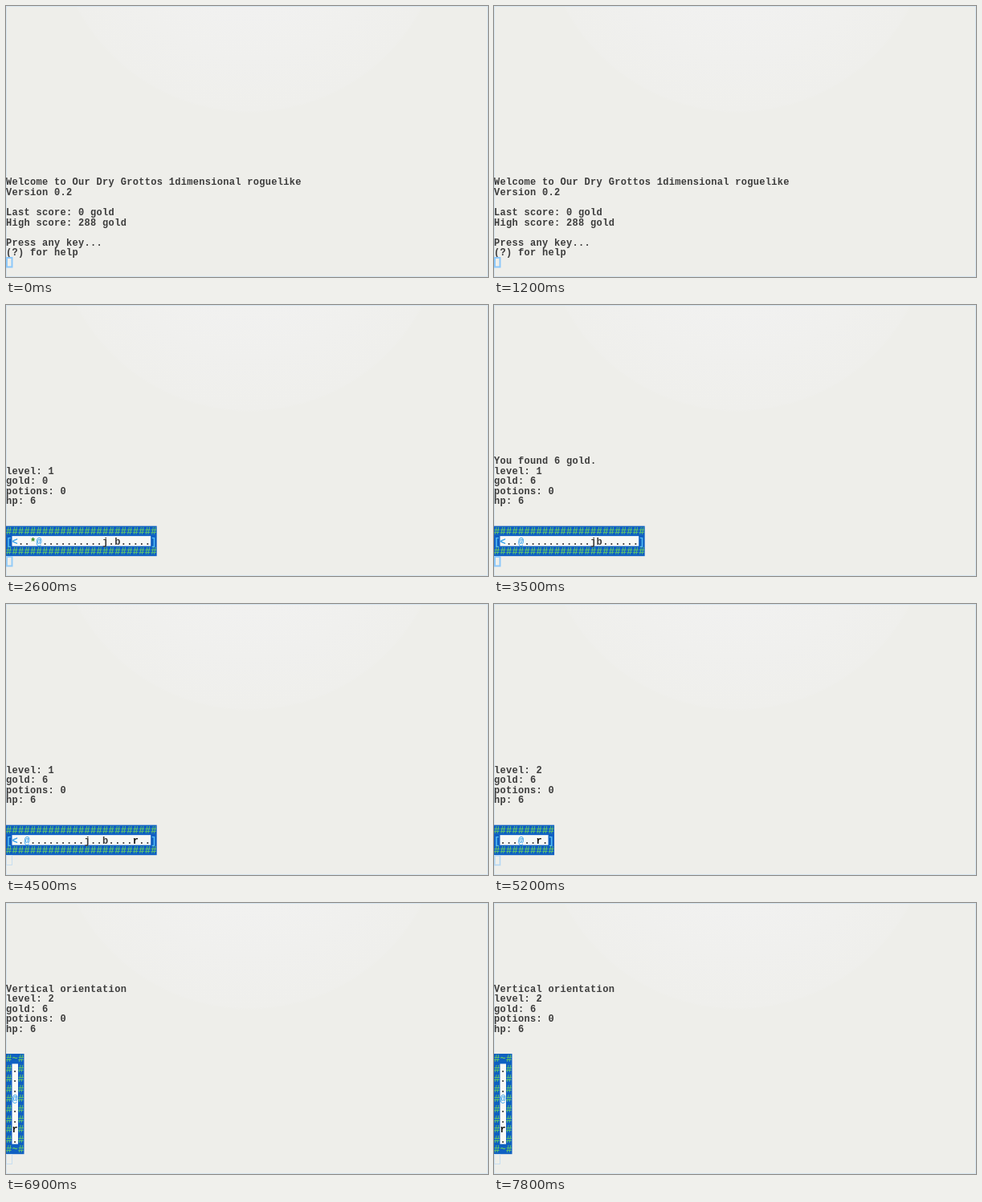
An HTML page with a canvas for the animation above (8 s loop, 600x338 px).

```html
<!DOCTYPE html>
<html lang="en">
<head>
<meta charset="utf-8">
<title>Terminal roguelike</title>
<style>
  html, body { margin: 0; width: 100%; height: 100%; overflow: hidden; }
  body { background: radial-gradient(circle 243px at 303px -110px, #f1f1f0 45%, #efefec 99%, #eeeeea); }
  canvas { display: block; }
</style>
</head>
<body>
<canvas id="screen" width="600" height="338"></canvas>
<script>
const ctx = document.getElementById('screen').getContext('2d');
const LOOP = 8000, CELL_W = 7.507, CELL_H = 12.52, BASELINE = 10.4, PROMPT_Y = 313.2;
const WALL = '#0f60c2', FLOOR = '#f8f9f7', INK = '#3c3c3c';
const GLYPHS = {
  '#': '#62c46c', '~': '#62c46c', '[': '#55bdf2', ']': '#55bdf2',
  '<': '#35a0ea', '@': '#35a0ea', '*': '#2f8a1c', r: '#111'
};

const WELCOME = [
  'Welcome to Our Dry Grottos 1dimensional roguelike', 'Version 0.2', '',
  'Last score: 0 gold', 'High score: 288 gold', '',
  'Press any key...', '(?) for help'
];

// Places pieces such as {'@': 4} in a corridor of the given length.
function corridor(length, pieces) {
  const cells = Array(length).fill('.');
  cells[0] = '[';
  cells[length - 1] = ']';
  for (const [glyph, at] of Object.entries(pieces)) cells[at] = glyph;
  return cells;
}

function game(level, gold, pieces, message = '', vertical = false) {
  const cells = corridor(level === 1 ? 25 : 10, pieces);
  const wall = '#'.repeat(cells.length);
  const map = vertical
    ? cells.map(c => '#' + ('[]'.includes(c) ? '~' : c) + '#')
    : [wall, cells.join(''), wall];
  const text = [message, 'level: ' + level, 'gold: ' + gold, 'potions: 0', 'hp: 6', '', ''];
  return { text, map };
}

const first = (hero, j, b, extra, gold = 6, message) =>
  game(1, gold, { '<': 1, ...extra, j, b, '@': hero }, message);
const second = (hero, r, message, vertical) =>
  game(2, 6, { '@': hero, r }, message, vertical);

const scenes = [
  [0, { text: WELCOME, map: [] }],
  [1500, first(7, 17, 19, { '*': 4 }, 0)],
  [2400, first(6, 17, 18, { '*': 4 }, 0)],
  [2600, first(5, 16, 18, { '*': 4 }, 0)],
  [2800, first(4, 16, 17, {}, 6, 'You found 6 gold.')],
  [3800, first(4, 15, 17, { r: 23 })],
  [4200, first(4, 14, 17, { r: 22 })],
  [4500, first(3, 13, 16, { r: 21 })],
  [4700, first(2, 12, 16, { r: 22 })],
  [5000, first(1, 11, 15, { r: 23 })],
  [5200, second(4, 7)],
  [6100, second(3, 8)],
  [6400, second(4, 7)],
  [6900, second(4, 7, 'Vertical orientation', true)]
];

// Every glyph sits on the terminal's cell grid.
function drawLine(line, top) {
  [...line].forEach((c, i) => ctx.fillText(c, i * CELL_W, top + BASELINE));
}

function drawMap(map, top) {
  const columns = map[0].length, rows = map.length;
  ctx.fillStyle = WALL;
  ctx.fillRect(0, top, columns * CELL_W, rows * CELL_H);
  ctx.fillStyle = FLOOR;
  ctx.fillRect(CELL_W, top + CELL_H, (columns - 2) * CELL_W, (rows - 2) * CELL_H);
  map.forEach((line, row) => [...line].forEach((c, column) => {
    ctx.fillStyle = GLYPHS[c] || INK;
    ctx.fillText(c, column * CELL_W, top + row * CELL_H + BASELINE);
  }));
}

function drawCursor(t) {
  const phase = (t + 250) % 1225;
  const fade = Math.min(1, Math.max(0, (phase - 300) / 430));
  ctx.lineWidth = 1;
  ctx.strokeStyle = '#c8def0';
  ctx.strokeRect(0.5, 313.5, 7, 12);
  ctx.globalAlpha = (1 + Math.cos(Math.PI * fade)) / 2;
  ctx.lineWidth = 2;
  ctx.strokeStyle = '#8cc8fa';
  ctx.strokeRect(1, 314, 6.5, 11.5);
  ctx.globalAlpha = 1;
}

function draw(now) {
  const t = now % LOOP;
  const { text, map } = scenes.filter(([start]) => start <= t).pop()[1];
  const mapTop = PROMPT_Y - map.length * CELL_H;
  const textTop = mapTop - text.length * CELL_H;

  ctx.clearRect(0, 0, 600, 338);
  ctx.lineWidth = 1;
  ctx.strokeStyle = '#d6e4ee';
  ctx.strokeRect(0.5, 0.5, 599, 337);

  ctx.font = 'bold 12px "Liberation Mono", monospace';
  ctx.fillStyle = INK;
  text.forEach((line, i) => drawLine(line, textTop + i * CELL_H));
  if (map.length) drawMap(map, mapTop);
  drawCursor(t);
  requestAnimationFrame(draw);
}
requestAnimationFrame(draw);
</script>
</body>
</html>
```
